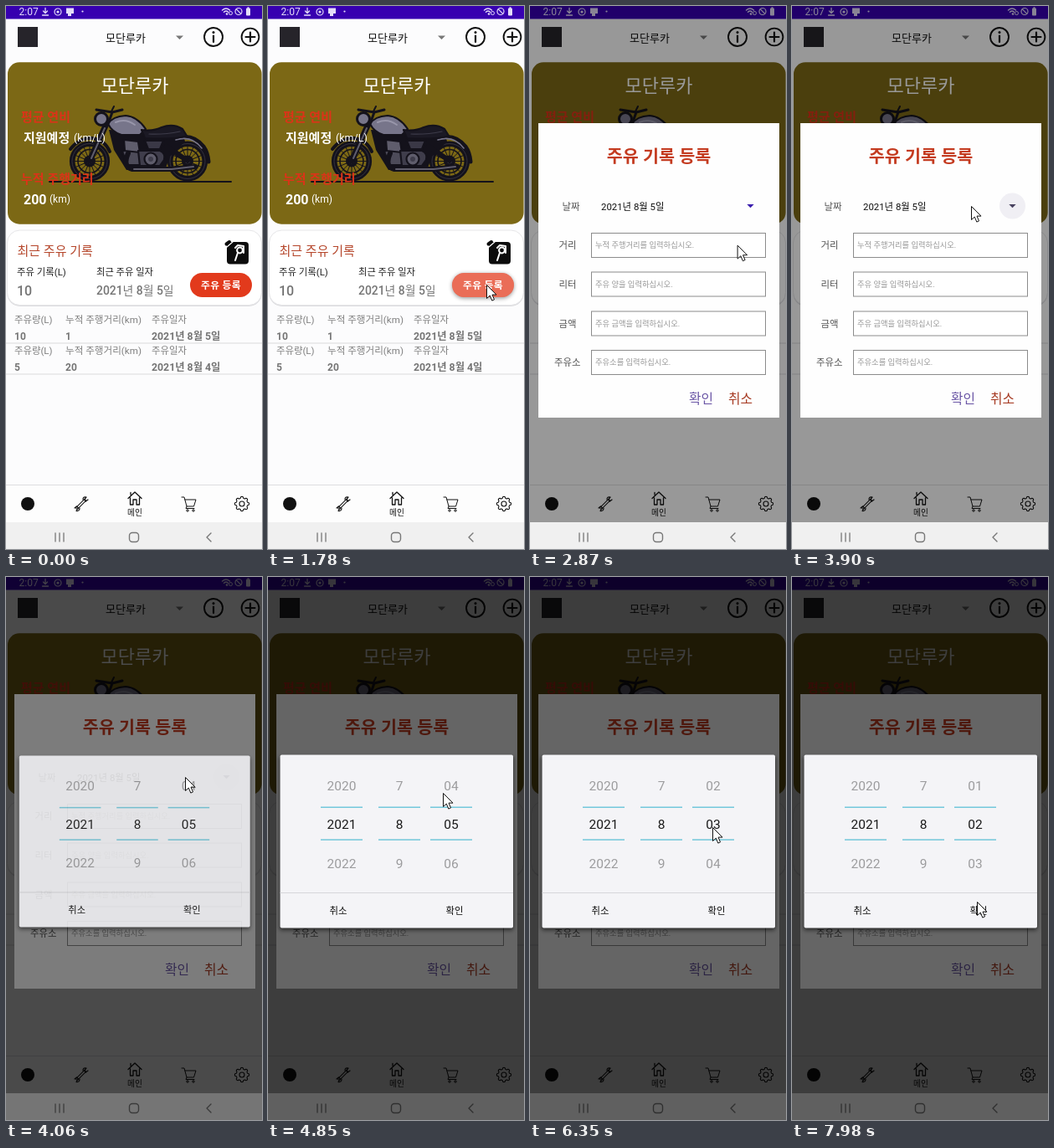
An HTML page that plays this animation: 306 by 649 pixels, repeating every 8000 ms.

```html
<!DOCTYPE html>
<html lang="ko">
<head>
<meta charset="utf-8">
<style>
html, body { margin: 0; width: 100%; height: 100%; overflow: hidden; background: #fcfcfd; }
svg { display: block; width: 100vw; height: 100vh; }
text { font-family: Roboto, "Noto Sans CJK KR", "Noto Sans CJK", sans-serif; white-space: pre; }
</style>
</head>
<body>
<svg id="stage" viewBox="0 0 306 649"></svg>
<script>
const LOOP = 8000, ROW = 46.5, MID = 295.5;
const NAME = '모단루카';
const GREY = '#757575', RED = '#e23a1c', INK = '#14121b';

// Markup helpers; text is placed by its vertical centre.
const text = (x, y, size, fill, str, extra = '') =>
  `<text x="${x}" y="${y + size * .37}" font-size="${size}" fill="${fill}" ${extra}>${str}</text>`;
const rect = (x, y, w, h, fill, extra = '') =>
  `<rect x="${x}" y="${y}" width="${w}" height="${h}" fill="${fill}" ${extra}/>`;
const circle = (x, y, r, fill, extra = '') =>
  `<circle cx="${x}" cy="${y}" r="${r}" fill="${fill}" ${extra}/>`;
const ring = (x, y, r, color, w = 1) => circle(x, y, r, 'none', `stroke="${color}" stroke-width="${w}"`);
const line = (d, color, w = 1, extra = '') =>
  `<path d="${d}" fill="none" stroke="${color}" stroke-width="${w}" stroke-linecap="round" stroke-linejoin="round" ${extra}/>`;
const shape = (d, fill, extra = '') => `<path d="${d}" fill="${fill}" ${extra}/>`;
const group = (id, body, extra = '') => `<g id="${id}" ${extra}>${body}</g>`;
const BOLD = 'font-weight="700"', MEDIUM = 'font-weight="500"', CENTER = 'text-anchor="middle"';

const polar = (cx, cy, r, a) => `${(cx + r * Math.cos(a)).toFixed(1)} ${(cy + r * Math.sin(a)).toFixed(1)}`;

function spokes(cx, cy, n, r0, r1) {
  let d = '';
  for (let i = 0; i < n; i++) {
    const a = i * 2 * Math.PI / n;
    d += `M${polar(cx, cy, r0, a)}L${polar(cx, cy, r1, a)}`;
  }
  return d;
}

function gear(cx, cy, teeth, r, depth) {
  const pts = [];
  for (let i = 0; i < 80; i++) {
    const a = i * Math.PI / 40;
    pts.push(polar(cx, cy, r + depth * Math.tanh(2.5 * Math.cos(teeth * a)), a));
  }
  return `M${pts.join('L')}Z`;
}

function statusBar() {
  const c = '#e4dcf8';
  return rect(0, 0, 306, 15.5, '#3700b0') +
    text(15.5, 7, 12, c, '2:07') +
    line('M47 2.5V8M44.5 6L47 8.5L49.5 6M43.5 11H50.5', c, 1.3) +
    ring(62, 7, 4, c, 1.2) + circle(62, 7, 1.6, c) +
    shape('M72 2.5H81V9H78V12H74V9H72Z', c) + circle(91.5, 6.5, 1.1, c) +
    line('M258.5 5Q263 1 267.5 5M260.5 7.2Q263 5 265.5 7.2', c, 1.4) + circle(264, 9.5, 1.3, c) +
    ring(268.5, 8.5, 2, c) + ring(278, 6.5, 4, c, 1.2) + line('M275.4 3.9L280.6 9.1', c, 1.2) +
    rect(287, 2.5, 5, 9, c, 'rx="1"') + rect(288.5, 1.3, 2, 2, c);
}

function header() {
  return rect(14, 25, 24, 24, '#26242a') +
    text(119, 38, 13, '#111', NAME) +
    shape('M203 35.5H212L207.5 40Z', '#777') +
    ring(248, 37, 11, '#111', 1.9) + line('M248 35.5V43', '#111', 2.2) + circle(248, 31.5, 1.5, '#111') +
    ring(292, 37, 10.4, '#111', 1.9) + line('M286.5 37H297.5M292 31.5V42.5', '#111', 2.2);
}

function wheel(cx) {
  return line(spokes(cx, 185.5, 16, 5, 18), INK, 1) +
    ring(cx, 185.5, 20.8, INK, 6.6) + ring(cx, 185.5, 21, '#3b3947', .8) +
    ring(cx, 185.5, 14, INK, 1.6) + circle(cx, 185.5, 7, INK) + circle(cx, 185.5, 2.8, '#5f5d6c');
}

function bike() {
  const edge = `stroke="${INK}" stroke-width="2.2" stroke-linejoin="round"`;
  return line('M52 210H269', INK, 2) + wheel(100) + wheel(217) +
    line('M77 171Q88 157 103 158Q118 160 124 174', INK, 4) +
    line('M120 141L100 185', INK, 7) + line('M118 146L102 182', '#5f5d6c', 2) +
    shape('M123 148L160 150L212 154L214 162L196 180L190 196H144L129 172Z', INK) +
    line('M192 168L217 185', INK, 6) +
    line('M198 160Q222 150 236 168Q241 175 242 186', INK, 5) +
    line('M203 160Q222 154 234 170', '#77758a', 1.6) +
    shape('M122 141Q127 132 143 131Q157 132 167 147L160 154L138 154Q127 151 122 141Z', '#77758a', edge) +
    line('M131 139Q143 134 154 142', '#9896aa', 2) +
    shape('M162 148Q176 150 186 145Q200 140 211 147L216 155Q202 160 166 158Z', '#1b1924', edge) +
    line('M171 153Q188 154 208 150', '#3d3b49', 1.2) +
    shape('M166 161H188L184 171H170Z', '#3a3846', edge) +
    shape('M139 174Q149 168 160 174V190H145Z', '#4d4b59', edge) +
    shape('M141 160L158 162L160 175L142 173Z', '#5f5d6c', edge) +
    shape('M158 173H184Q191 176 189 184L184 191H160Z', '#3f3d4b', edge) +
    circle(173, 183, 7.5, '#5f5d6c', edge) + circle(173, 183, 3, '#3f3d4b') +
    line('M146 176Q139 192 151 195H198L226 192', INK, 6) + line('M153 195H198L224 192', '#5f5d6c', 2) +
    circle(114, 135, 7.5, '#77758a', `stroke="${INK}" stroke-width="3"`) +
    line('M108 124L127 127L139 124M127 127L122 141', INK, 3) + line('M126 126L129 120', INK, 2);
}

function heroCard() {
  return rect(2, 67.3, 303.6, 193.4, '#7c6815', 'rx="14"') + bike() +
    text(154, 95, 22, '#fff', NAME, CENTER) +
    text(18, 132.5, 15, '#dc3318', '평균 연비', BOLD) +
    text(21, 157, 15, '#fff', '지원예정', BOLD) + text(81, 157.5, 12.5, '#fff', '(km/L)') +
    text(18, 206, 15, '#dc3318', '누적 주행거리', BOLD) +
    text(21, 231, 16, '#fff', '200', BOLD) + text(52, 231, 12, '#fff', '(km)');
}

function logCard() {
  return rect(1.5, 270, 304, 89, '#dcdcdf', 'rx="15"') +
    rect(1.5, 268, 304, 89.5, '#fff', 'rx="15" stroke="#e6e6e8"') +
    text(13.5, 292, 15, '#b5462b', '최근 주유 기록', MEDIUM) +
    text(13, 318, 11.4, '#222', '주유 기록(L)') + text(108, 318, 11.3, '#222', '최근 주유 일자') +
    text(13, 340.5, 16, GREY, '10', MEDIUM) + text(108, 339.5, 13.9, GREY, '2021년 8월 5일', MEDIUM) +
    rect(264, 282, 26, 26.5, '#0c0c0c', 'rx="4"') + line('M263.5 284.5L267 282', '#0c0c0c', 4) +
    line('M264 288L271 282', '#fff', 1.2) +
    line('M274 289L277 286L284 287V295M277 295L274 304', '#fff', 2) + ring(279.5, 292, 3.4, '#fff', 2) +
    rect(220, 320, 74, 29.5, '#000', 'id="lift" rx="14.75" opacity="0" filter="url(#soft)"') +
    rect(220, 319, 74, 29, RED, 'rx="14.5"') +
    rect(220, 319, 74, 29, '#fff', 'id="flash" rx="14.5" opacity="0"') +
    text(257, 333.5, 11.8, '#fff', '주유 등록', `${BOLD} ${CENTER} letter-spacing=".3"`);
}

function record(y, litres, km, date) {
  return text(10, y, 11.4, '#808080', '주유량(L)') + text(71, y, 11.6, '#808080', '누적 주행거리(km)') +
    text(174, y, 11.4, '#808080', '주유일자') +
    text(10, y + 20, 12, GREY, litres, BOLD) + text(71, y + 20, 12, GREY, km, BOLD) +
    text(174, y + 20, 12.3, GREY, date, BOLD) + rect(0, y + 28, 306, 1, '#dcdcdc');
}

function tabs() {
  const c = '#111';
  return rect(0, 572, 306, 1, '#dedee0') + rect(0, 573, 306, 44, '#fdfdfd') +
    circle(26, 595, 8, c) +
    line('M85 600L94 591', c, 3.6) + line('M85 600L94 591', '#fff', 1.5) +
    line('M98 590L95.5 592L93.5 590L96 587Q92 586 92 590M82 600L84.5 598L86.5 600L84 603.5Q88 604 88 600', c, 1.2) +
    line('M146 588.5L154 581L162 588.5M148.5 588V596H152V590H156V596H159.5V588M149 584V581.5', c, 1.3) +
    text(154, 605, 9.7, c, '메인', CENTER) +
    line('M210 587H213L216 598H224.5L227 590H214M216 598L215 600.5H225', c, 1) +
    ring(217, 603, 1.2, c) + ring(224, 603, 1.2, c) +
    line(gear(282, 595, 8, 7.7, .9), c, 1.1) + ring(282, 595, 3, c, 1.1);
}

function navBar() {
  const c = '#777';
  return rect(0, 617, 306, 32, '#f0f0f0') + line('M59 630V640M64 630V640M69 630V640', c, 1.3) +
    rect(147.5, 629.5, 11, 11, 'none', `rx="3.5" stroke="${c}" stroke-width="1.4"`) +
    line('M245 630L240 635L245 640', c, 1.4);
}

function field(y, label, x, hint) {
  return text(x, y, 11.4, '#555', label, MEDIUM) +
    rect(73.5, y - 14.5, 208, 29, '#fff', 'stroke="#8c8c8c"') + text(78, y, 9.3, '#979797', hint);
}

function form() {
  return rect(10, 140, 288, 352, '#fefefe') +
    text(154, 179, 20.7, '#c43b20', '주유 기록 등록', `${BOLD} ${CENTER}`) +
    text(38.5, 240, 11.4, '#555', '날짜', MEDIUM) + text(85, 240, 11.4, '#111', '2021년 8월 5일') +
    circle(263.5, 239, 15.5, '#f0eff4', 'id="ripple" opacity="0"') +
    shape('M259.3 237H267.7L263.5 241.3Z', '#3b1fae', 'id="arrow"') +
    field(286, '거리', 34.5, '누적 주행거리를 입력하십시오.') +
    field(332.5, '리터', 34.5, '주유 양을 입력하십시오.') +
    field(379.5, '금액', 34.5, '주유 금액을 입력하십시오.') +
    field(426, '주유소', 29, '주유소를 입력하십시오.') +
    text(190, 469.5, 15.8, '#6b57a6', '확인') + text(237, 469.5, 15.8, '#a63a22', '취소');
}

const pad = n => String(n).padStart(2, '0');

function column(cx, value, show = String) {
  let out = '';
  for (let n = Math.floor(value) - 2; n <= value + 2; n++) {
    const off = n - value, fade = Math.max(.12, 1 - .6 * Math.abs(off));
    out += text(cx, MID + off * ROW, 15.5, '#1a1a1a', show(n), `${CENTER} opacity="${fade}"`);
  }
  return out;
}

function picker() {
  const rules = [63, 132, 194].map(x => rect(x, 274.5, 50, 1.5, '#73c8db') + rect(x, 313.3, 50, 1.5, '#73c8db')).join('');
  return rect(14, 215, 279, 207, '#000', 'rx="2" opacity=".6" filter="url(#soft)"') +
    rect(14.5, 212.5, 278.5, 207, '#f4f4f7', 'rx="2"') +
    `<g clip-path="url(#drum)">${column(88, 2021)}${column(157, 8)}${group('days', '')}</g>` + rules +
    rect(14.5, 377, 278.5, 1, '#d6d6da') +
    text(84, 399, 11.4, '#111', '취소', CENTER) + text(223, 399, 11.4, '#111', '확인', CENTER);
}

const stage = document.getElementById('stage');
stage.innerHTML =
  `<defs><filter id="soft" x="-20%" y="-40%" width="140%" height="190%"><feGaussianBlur stdDeviation="2.5"/></filter>
   <clipPath id="drum"><rect x="15" y="228" width="278" height="136"/></clipPath></defs>` +
  rect(0, 0, 306, 649, '#fcfcfd') + statusBar() + header() + heroCard() + logCard() +
  record(374.5, '10', '1', '2021년 8월 5일') + record(411.5, '5', '20', '2021년 8월 4일') + tabs() +
  rect(0, 15.5, 306, 599.5, '#000', 'id="dim"') +
  group('bars', rect(0, 0, 306, 15.5, '#000') + rect(0, 615, 306, 2, '#000')) +
  navBar() + group('form', form()) +
  rect(0, 0, 306, 649, '#000', 'id="dim2"') + group('picker', picker()) +
  group('cursor', shape('M0 0V16L3.8 12.6L6.3 18.6L9 17.4L6.5 11.6H11.5Z', '#fff', 'stroke="#111" stroke-linejoin="round"'));

const el = id => document.getElementById(id);
const set = (id, name, value) => el(id).setAttribute(name, value);
const span = (t, a, b) => Math.min(1, Math.max(0, (t - a) / (b - a)));
const easeOut = p => 1 - (1 - p) ** 3;
const smooth = p => p * p * (3 - 2 * p);

// Keys are [time, ...values]; eased between neighbours, held outside.
function track(keys, t) {
  if (t <= keys[0][0]) return keys[0].slice(1);
  for (let i = 1; i < keys.length; i++) {
    const a = keys[i - 1], b = keys[i];
    if (t < b[0]) {
      const p = smooth(span(t, a[0], b[0]));
      return a.slice(1).map((v, k) => v + (b[k + 1] - v) * p);
    }
  }
  return keys[keys.length - 1].slice(1);
}

const POINTER = [
  [760, 246, 527], [920, 262, 425], [1080, 258, 340], [1240, 261, 333],
  [2560, 261, 333], [2950, 246, 280], [3120, 240, 262], [3400, 222, 243], [3600, 214, 239],
  [4400, 214, 239], [4800, 209, 258], [4880, 209, 258], [5250, 213, 304], [5400, 213, 304],
  [5650, 214, 253], [5750, 214, 253], [6200, 218, 299], [6380, 218, 299],
  [6620, 217, 256], [6700, 217, 256], [7080, 220, 302], [7200, 220, 302], [7750, 221, 388]
];
const DAY = [[4880, 5], [5300, 4], [5750, 4], [6250, 3], [6700, 3], [7120, 2]];

function popIn(id, p, lift = 0) {
  const s = .94 + .06 * p;
  set(id, 'opacity', Math.min(1, p * 1.02));
  set(id, 'transform', `translate(154 ${316 - lift}) scale(${s}) translate(-154 -316)`);
  set(id, 'visibility', p > 0 ? 'visible' : 'hidden');
}

function draw(t) {
  const press = span(t, 1540, 1700);
  set('flash', 'opacity', .26 * press);
  set('lift', 'opacity', .4 * press);

  // The system bars dim only once the form has settled.
  const open = easeOut(span(t, 1800, 2020)), settle = span(t, 1980, 2080);
  set('dim', 'opacity', .4 * open);
  set('bars', 'opacity', .4 * settle);
  popIn('form', open, 1 - settle);

  const tap = span(t, 3640, 3840);
  set('ripple', 'opacity', tap);
  set('arrow', 'fill', tap > .3 ? '#48425f' : '#3b1fae');

  const pick = easeOut(span(t, 3940, 4200));
  set('dim2', 'opacity', .6 * pick);
  popIn('picker', pick);
  el('days').innerHTML = column(219, track(DAY, t)[0], pad);

  const [x, y] = track(POINTER, t);
  set('cursor', 'transform', `translate(${x + .5} ${y + .5})`);
  set('cursor', 'visibility', t >= 760 ? 'visible' : 'hidden');
}

const start = performance.now();
function tick() {
  draw((performance.now() - start) % LOOP);
  requestAnimationFrame(tick);
}
tick();
</script>
</body>
</html>
```
